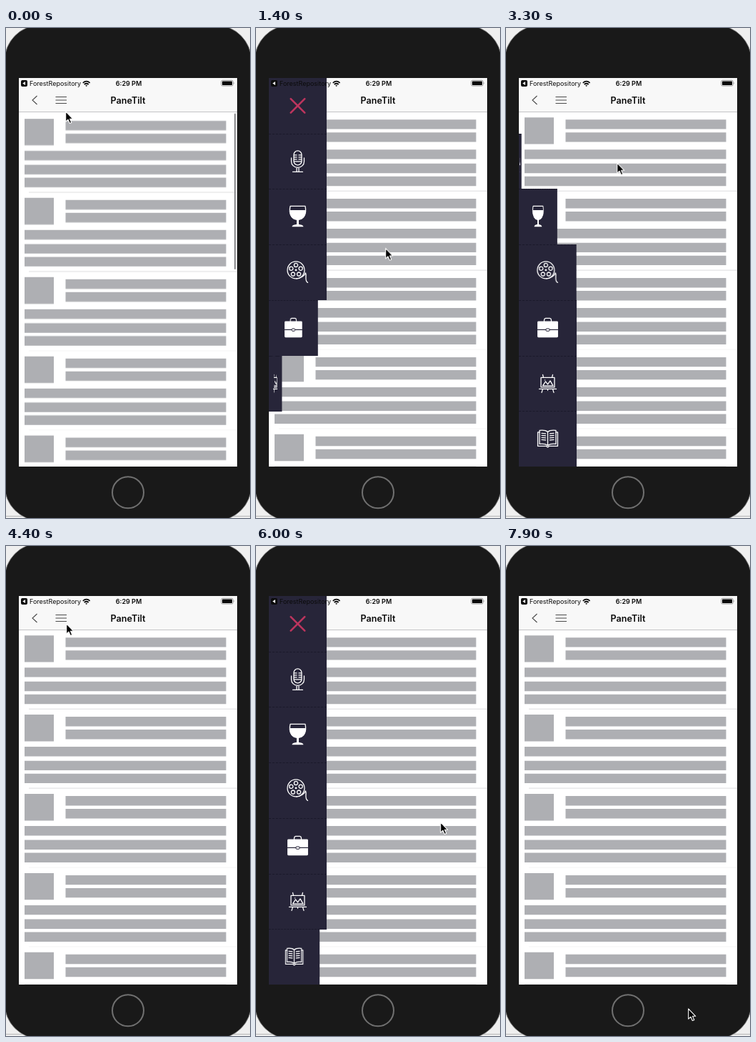
These frames come from a looping animation (342x686 px, 8 s). An HTML page without scripts:

```html
<!DOCTYPE html>
<html lang="en">
<head>
<meta charset="utf-8">
<title>Folding side menu</title>
<style>
  html, body { margin: 0; width: 100%; height: 100%; overflow: hidden; background: #efefef; }
  .stage { position: relative; width: 342px; height: 686px; overflow: hidden; }
  .layer { position: absolute; left: 0; top: 0; width: 342px; height: 686px; }
  text { font-family: Inter, sans-serif; fill: #0b0b0b; }
  .line { fill: none; stroke: #fff; stroke-width: 1.3; stroke-linecap: round; stroke-linejoin: round; }

  .list { animation: settle 8s infinite; }
  @keyframes settle {
    0% { transform: translateY(1.75px); animation-timing-function: ease-out; }
    4%, 100% { transform: none; }
  }
  .scrollbar { animation: fade 8s linear infinite; }
  @keyframes fade { 0%, 3% { opacity: 1; } 7%, 100% { opacity: 0; } }

  /* Each panel folds on its left edge, 150 ms after the one above. */
  .menu { position: absolute; left: 18px; top: 70px; width: 81px; height: 544px; }
  .item {
    position: absolute; left: 0; top: calc(var(--i) * 77.714px);
    width: 81px; height: 77.8px; background: #272539;
    transform-origin: 0 50%;
    animation: fold 8s linear calc(var(--i) * 150ms) infinite backwards;
  }
  .item svg { display: block; width: 81px; height: 77.8px; }
  .item + .item { border-top: 1px dashed #1a192a; box-sizing: border-box; }
  .item + .item svg { margin-top: -1px; }
  @keyframes fold {
    0%, 7.59% { transform: rotateY(90deg); }
    11.34% { transform: rotateY(0deg); }
    34.775% { transform: rotateY(0deg); animation-timing-function: ease-in-out; }
    40.025%, 61.2% { transform: rotateY(90deg); }
    64.95% { transform: rotateY(0deg); }
    81.875% { transform: rotateY(0deg); animation-timing-function: ease-in-out; }
    87.125%, 100% { transform: rotateY(90deg); }
  }

  .cursor {
    position: absolute; left: 0; top: 0; width: 14px; height: 20px; overflow: visible;
    animation: point 8s ease-in-out infinite;
  }
  @keyframes point {
    0% { transform: translate(83px, 116px); }
    5% { transform: translate(78px, 102px); }
    7.5% { transform: translate(78px, 103px); animation-timing-function: ease-in; }
    11.25% { transform: translate(91px, 124px); animation-timing-function: ease-out; }
    22.5% { transform: translate(212px, 371px); }
    25% { transform: translate(213px, 374px); }
    33.5% { transform: translate(60px, 108px); }
    35.5% { transform: translate(60px, 108px); animation-timing-function: ease-in; }
    41.25% { transform: translate(155px, 188px); animation-timing-function: ease-out; }
    45.5% { transform: translate(173px, 208px); }
    55% { transform: translate(84px, 108px); animation-timing-function: ease-out; }
    57.5%, 61% { transform: translate(77px, 100px); }
    70% { transform: translate(254px, 385px); animation-timing-function: ease-out; }
    72.5% { transform: translate(269px, 402px); }
    75% { transform: translate(258px, 386px); }
    81.25%, 82.5% { transform: translate(58px, 98px); }
    92.5% { transform: translate(269px, 589px); animation-timing-function: ease-out; }
    95% { transform: translate(276px, 622px); }
    98.75%, 100% { transform: translate(255px, 647px); }
  }
</style>
</head>
<body>
<div class="stage">

  <svg class="layer" viewBox="0 0 342 686">
    <defs>
      <clipPath id="screen"><path d="M18 70H324V614H18Z"/></clipPath>
      <g id="cell" fill="#aeafb3">
        <path d="M26 125.2h41v37.4h-41z"/>
        <path d="M83.5 128.2h225v13.4h-225zm0 18h225v13.4h-225z"/>
        <path d="M26 170.2h282.5v13.4H26zm0 19.6h282.5v13.4H26zm0 18h282.5v13.4H26z"/>
      </g>
      <path id="rule" d="M32 228.2H324" stroke="#dcdcde"/>
    </defs>

    <path d="M0 683.5H342" stroke="#b5b5b5"/>
    <rect x="-2" y="-4" width="346" height="694" rx="50" fill="#191919" stroke="#8a8a8a" stroke-width=".8"/>
    <circle cx="171" cy="650.3" r="22" fill="none" stroke="#707070" stroke-width="2"/>

    <g clip-path="url(#screen)">
      <path d="M18 70H324V614H18Z" fill="#fff"/>
      <g class="list">
        <use href="#cell"/>
        <use href="#cell" y="110.9"/>
        <use href="#cell" y="221.8"/>
        <use href="#cell" y="332.7"/>
        <use href="#cell" y="443.6"/>
        <use href="#rule"/>
        <use href="#rule" y="110.9"/>
        <use href="#rule" y="221.8" opacity=".3"/>
        <use href="#rule" y="332.7" opacity=".3"/>
      </g>
      <path class="scrollbar" d="M321 120.5V337" stroke="#8a8a8c" stroke-width="2" stroke-linecap="round"/>
      <path d="M18 70H324V118H18Z" fill="#f8f8f8"/>
      <path d="M18 117.5H324" stroke="#c4c4c6"/>
      <path d="M43.5 95L37 101l6.500 6M69.500 96.500h15.500m-15.500 4.500h15.500m-15.500 4.500h15.500" fill="none" stroke="#4a4a4a" stroke-width="1.100"/>
      <text x="171" y="105.600" font-size="12.600" font-weight="600" text-anchor="middle">PaneTilt</text>
    </g>
  </svg>

  <div class="menu">
    <div class="item" style="--i:0">
      <svg viewBox="-40.5 -39 81 78">
        <path d="M-9.800-9.800L9.800 9.800M9.800-9.800L-9.800 9.800" stroke="#bd355e" stroke-width="2.600" stroke-linecap="round"/>
      </svg>
    </div>
    <div class="item" style="--i:1">
      <svg viewBox="-40.5 -39 81 78">
        <g class="line">
          <rect x="-5.500" y="-15" width="11" height="20" rx="5.500"/>
          <path d="M-9-5V0a9 8.500 0 0 0 18 0V-5M-1.500 9v5M1.500 9v5M-7 14.500H7"/>
          <path d="M-5-9h3.500m3 0H5M-5-6h3.500m3 0H5M-5-3h3.500m3 0H5M-5 0H5"/>
        </g>
      </svg>
    </div>
    <div class="item" style="--i:2">
      <svg viewBox="-40.5 -39 81 78">
        <path class="line" d="M-10.500-14.500h21C12.500-5 10 4 0 4S-12.500-5-10.500-14.500Z"/>
        <path d="M-11.300-9h22.600C11.500-2 8 4.500 1.500 4.800V11C4 11.500 8 12 8 14.500H-8C-8 12-4 11.500-1.500 11V4.800C-8 4.500-11.500-2-11.300-9Z" fill="#fff"/>
      </svg>
    </div>
    <div class="item" style="--i:3">
      <svg viewBox="-40.5 -39 81 78">
        <g class="line">
          <circle cx="-2.500" cy="-3" r="12"/>
          <circle cx="-2.500" cy="-10" r="2.600"/>
          <circle cx="4.200" cy="-5.200" r="2.600"/>
          <circle cx="1.600" cy="2.700" r="2.600"/>
          <circle cx="-6.600" cy="2.700" r="2.600"/>
          <circle cx="-9.200" cy="-5.200" r="2.600"/>
          <circle cx="-2.500" cy="-3" r=".8"/>
          <path d="M-2 9C5 9 10 4 11 1C13 4 9 12 14 14.500"/>
        </g>
      </svg>
    </div>
    <div class="item" style="--i:4">
      <svg viewBox="-40.5 -39 81 78">
        <path class="line" d="M-5-9v-2q0-2 2-2.500H3q2 .5 2 2.500v2"/>
        <rect x="-14.500" y="-9.500" width="29" height="23" rx="1.500" fill="#fff"/>
        <path d="M-14.500 2.500h29" stroke="#272539" stroke-width="1.200"/>
        <rect x="-2.500" y="1" width="5" height="3.400" rx="1" fill="#fff" stroke="#272539"/>
      </svg>
    </div>
    <div class="item" style="--i:5">
      <svg viewBox="-40.5 -39 81 78">
        <g class="line">
          <path d="M-9.500-8.500h19v13.500h-19zM-12 7.500h24M-6-8.500l-1-4M6-8.500l1-4M-7 7.500l-1.500 5M7 7.500l1.500 5M0 7.500v2"/>
          <path d="M-7 3l4-6 3 4 3.500-5L7.500 3ZM-4-5h.1"/>
        </g>
      </svg>
    </div>
    <div class="item" style="--i:6">
      <svg viewBox="-40.5 -39 81 78">
        <g class="line" stroke-width="1.200">
          <path d="M0-9.500C-3-12-7-12-11.500-11.500V7.500C-7 7-3 7.500 0 9.500C3 7.500 7 7 11.500 7.500V-11.500C7-12 3-12 0-9.500V9.500"/>
          <path d="M-11.500-9H-14V10.500H-2L0 12l2-1.500H14V-9H11.500"/>
          <path d="M-8.500-7.500l5.500.5m-5.500 2.500l5.500.5m-5.500 2.500l5.500.5m-5.500 2.500l5.500.5M8.500-7.500L3-7M8.500-4.500L3-4M8.500-1.500L3-1M8.500 1.500L3 2"/>
        </g>
      </svg>
    </div>
  </div>

  <svg class="layer" viewBox="0 0 342 686">
    <rect x="21" y="73" width="9" height="9" rx="2" fill="#0b0b0b"/>
    <path d="M27 75v5l-3.800-2.500z" fill="#fff"/>
    <text x="33" y="81" font-size="9" textLength="auto">ForestRepository</text>
    <g fill="none" stroke="#0b0b0b" stroke-width="1.700">
      <path d="M107.800 76.800q4.900-4.200 9.800 0M109.700 79q3-2.500 6 0"/>
    </g>
    <path d="M111.200 80.500q1.500-1.100 3 0L112.700 82z" fill="#0b0b0b"/>
    <text x="172" y="81" font-size="9" font-weight="600" text-anchor="middle">6:29 PM</text>
    <rect x="301.800" y="73.300" width="16.400" height="7.800" rx="1.800" fill="none" stroke="#777" stroke-width=".7"/>
    <rect x="303" y="74.400" width="14" height="5.600" rx=".8" fill="#0b0b0b"/>
    <path d="M319 75.800q1.400 1.400 0 2.800z" fill="#777"/>
  </svg>

  <svg class="cursor" viewBox="0 0 14 20">
    <path d="M.7.8V15.200L4 12.200l2.300 5.300 2.500-1.100-2.300-5.100h4.300Z" fill="#000" stroke="#fff" stroke-width="1.100" stroke-linejoin="round"/>
  </svg>

</div>
</body>
</html>
```
